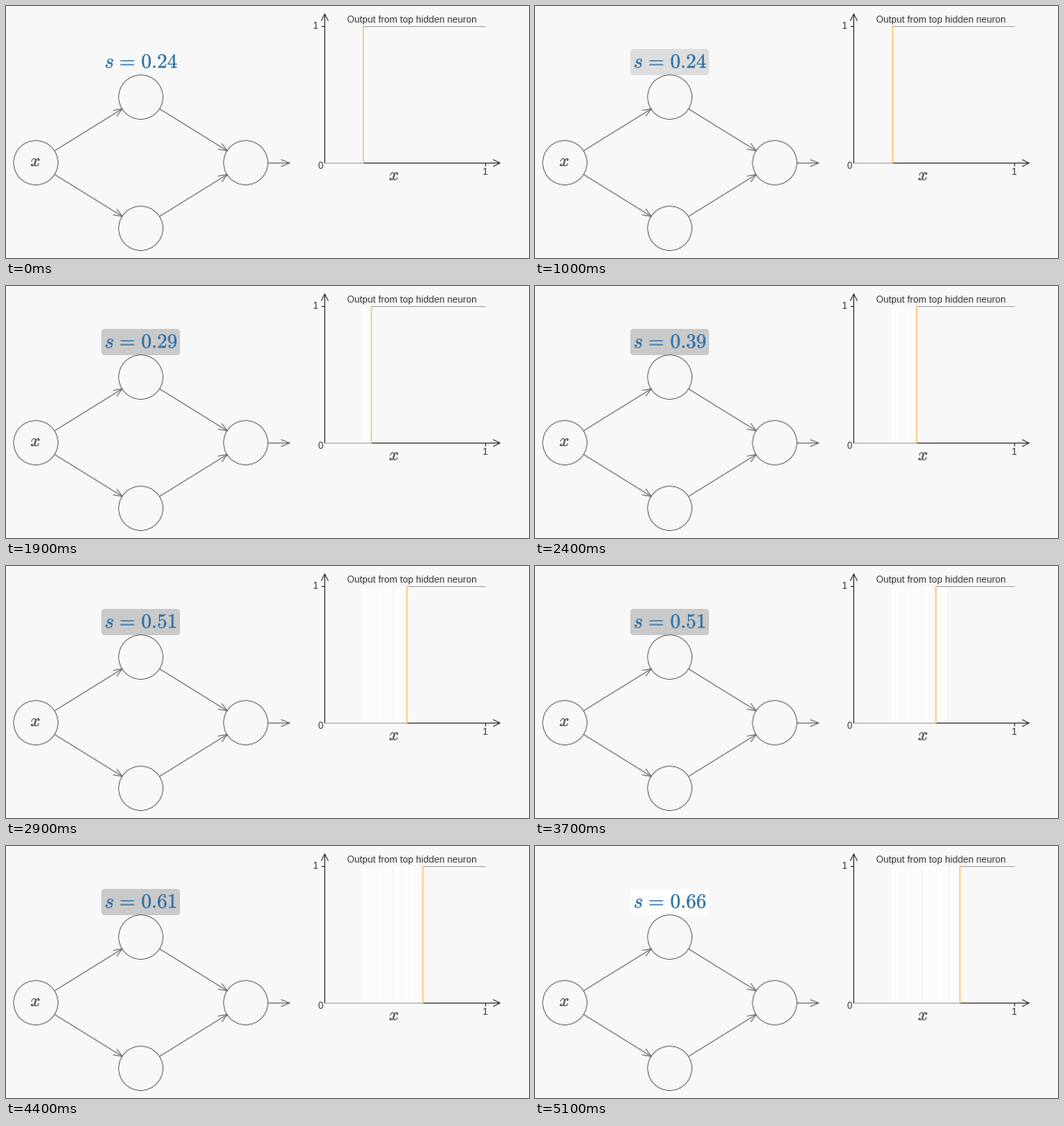
Animation, 598 px wide and 288 px high, one loop 5800 ms. Source, as a matplotlib script:

```python
import numpy as np
import matplotlib.pyplot as plt
from matplotlib.animation import FuncAnimation
from matplotlib.collections import LineCollection
from matplotlib.patches import Circle, FancyBboxPatch, PathPatch
from matplotlib.textpath import TextPath
from matplotlib.transforms import Affine2D

W, H, DPI = 598, 288, 64
PX = 72 / DPI  # points per pixel
FRAMES, INTERVAL = 58, 100

BG, BLUE, ORANGE = "#f8f8f8", "#2a6ea6", "#ffb347"
NODE, EDGE, AXIS, CURVE = "#5c5c5c", "#6a6a6a", "#333333", "#a9a9a9"
HOVER, PRESSED, FADED = "#dddddd", "#c9c9c9", "#fdfdfd"

# plot area
X0, X1, Y0, Y1 = 364.5, 548.5, 179.5, 23.5

# number label
VALUE_X, VALUE_Y, VALUE_SIZE = 154.7, 70.7, 23.2

# drag path of the step position: frame -> s
KEYS = [15, 16, 17, 18, 19, 24, 30, 32, 36, 37, 39, 40, 44, 47]
STEPS = [.24, .25, .27, .27, .29, .39, .53, .57, .57, .51, .45, .46, .61, .66]
S = np.round(np.interp(np.arange(FRAMES), KEYS, STEPS), 2)

plt.rcParams.update({
    "font.family": "Liberation Sans",
    "mathtext.fontset": "cm",
    "path.snap": False,
    "toolbar": "None",
})

fig = plt.figure(figsize=(W / DPI, H / DPI), dpi=DPI, facecolor=BG)
ax = fig.add_axes([0, 0, 1, 1])
ax.set(xlim=(0, W), ylim=(H, 0))
ax.axis("off")


def line(xs, ys, color, z=2):
    return ax.plot(xs, ys, color=color, lw=PX, zorder=z,
                   solid_capstyle="butt")[0]


def arrow(start, tip, color, length=10, half=4):
    start, tip = np.array(start, float), np.array(tip, float)
    line(*zip(start, tip), color)
    back = (start - tip) / np.hypot(*(start - tip))
    side = np.array([-back[1], back[0]])
    base = tip + length * back
    line(*zip(base + half * side, tip, base - half * side), color)


def math_path(text, x, y, size):
    flip = Affine2D().scale(1, -1).translate(x, y)
    return flip.transform_path(TextPath((0, 0), f"${text}$", size=size))


def math(text, x, y, size, color):
    patch = PathPatch(math_path(text, x, y, size), fc=color, ec=color,
                      lw=0.3 * PX, zorder=4)
    return ax.add_patch(patch)


def label(text, x, y, ha="center"):
    ax.text(x, y, text, size=10.75 * PX, color="#333333", ha=ha, va="baseline")


def step_x(s):
    return X0 + (X1 - X0) * s


# network
NODES = [(34, 179), (154, 104), (154, 254), (274, 179)]
LINKS = [(0, 1), (0, 2), (1, 3), (2, 3)]
for x, y in NODES:
    ax.add_patch(Circle((x + .1, y + .1), 25.3, fill=False,
                        ec=NODE, lw=0.85 * PX, zorder=3))
for a, b in LINKS:
    (xa, ya), (xb, yb) = NODES[a], NODES[b]
    slope = np.sign(yb - ya)
    arrow((xa + 21.5, ya + 13.5 * slope), (xb - 21, yb - 13.5 * slope), EDGE)
arrow((299.5, 179.5), (324.5, 179.5), EDGE)
math("x", 28, 183, 19.5, "#444444")

# slider label
panel = ax.add_patch(FancyBboxPatch(
    (109, 49), 90, 30, boxstyle="round,pad=0,rounding_size=4", lw=0, zorder=1))
math("s", 112.7, VALUE_Y, VALUE_SIZE, BLUE)
math("=", 125.5, VALUE_Y, VALUE_SIZE, BLUE)
value = math("0.24", VALUE_X, VALUE_Y, VALUE_SIZE, BLUE)

# axes
arrow((X0, Y0), (X0, 9), AXIS, 8)
arrow((X0, Y0), (565, Y0), AXIS, 8)
line([361, X0], [Y1, Y1], AXIS)
line([X1, X1], [Y0, 183], AXIS)
label("Output from top hidden neuron", 390, 19, "left")
label("1", 353.5, 26)
label("0", 360, 186)
label("1", 547.5, 193)
math("x", 438, 199, 19.5, "#444444")

# step function and its faint wake
wake = ax.add_collection(LineCollection([], colors="#fefefe", lw=2.4 * PX, zorder=1))
low = line([], [], CURVE, 3)
high = line([], [], CURVE, 3)
rise = line([], [], ORANGE, 4)


def panel_color(i):
    if i < 10:
        return BG
    if i < 16:
        return HOVER
    return PRESSED if i < 51 else FADED


def draw(i):
    s = S[i]
    x = step_x(s)
    panel.set_facecolor(panel_color(i))
    value.set_path(math_path(f"{s:.2f}", VALUE_X, VALUE_Y, VALUE_SIZE))
    low.set_data([X0 + .5, x], [Y0, Y0])
    high.set_data([x, X1], [Y1, Y1])
    rise.set_data([x, x], [Y1 - .5, Y0 + .5])
    past = step_x(np.unique(S[:i + 1][S[:i + 1] != s]))
    wake.set_segments([[(p, Y1 + .5), (p, Y0 - .5)] for p in past])
    return panel, value, low, high, rise, wake


anim = FuncAnimation(fig, draw, frames=FRAMES, interval=INTERVAL,
                     init_func=lambda: draw(0), repeat=True, repeat_delay=0)
plt.show()
```
